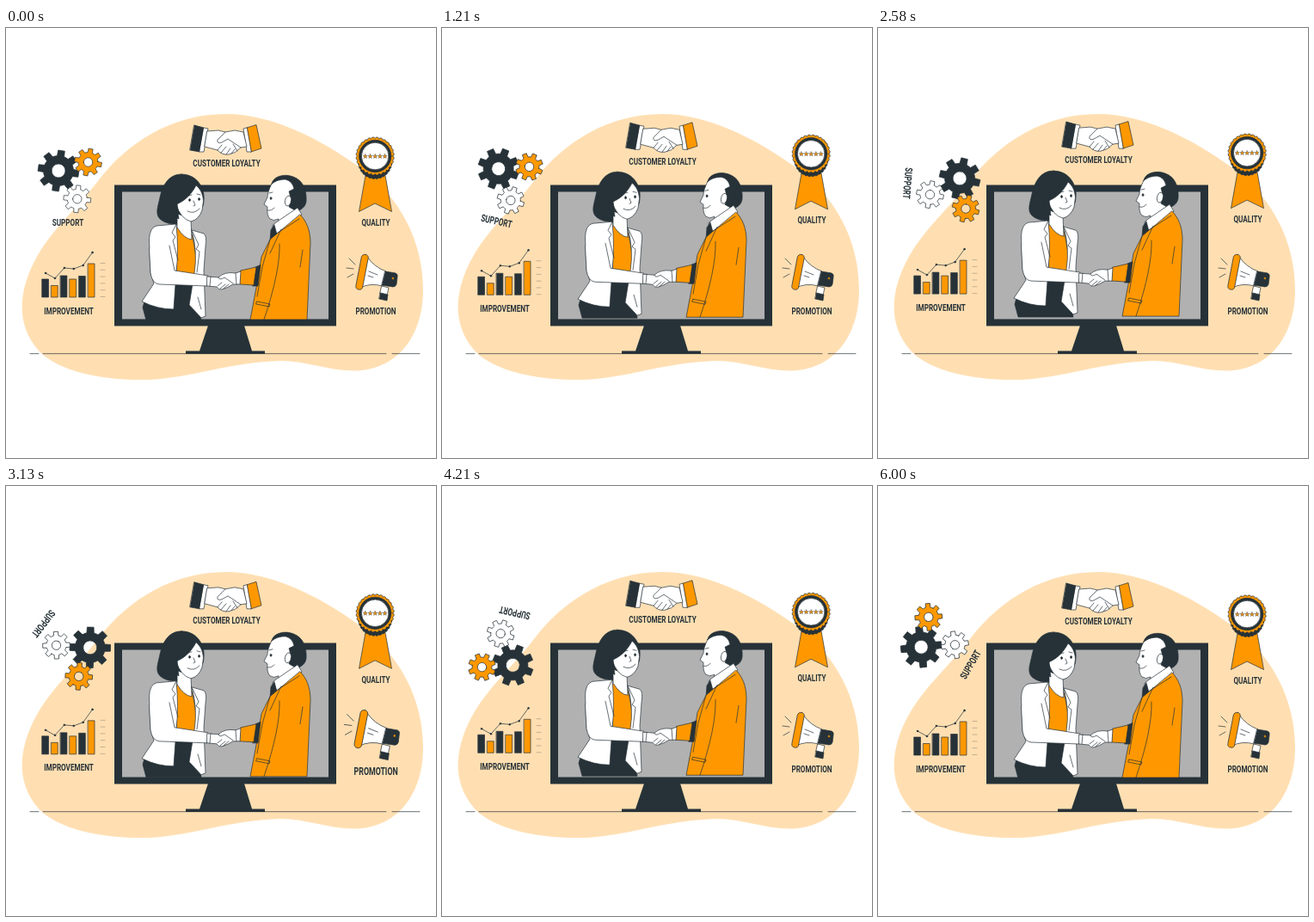
Recreate the animation shown at these times as an HTML page. Size 500 px wide and 500 px high, loop 6.04 s.

```html
<!DOCTYPE html>
<html lang="en">
<head>
<meta charset="utf-8">
<title>Customer loyalty</title>
<style>
  html, body { margin: 0; width: 100%; height: 100%; overflow: hidden; background: #fff; }
  svg { display: block; width: 100%; height: 100%; }
  text { font: 700 11.8px Roboto, "Liberation Sans", sans-serif; text-anchor: middle; fill: #263238; stroke: none; }
  .d { fill: #263238; }
  .o { fill: #ff9800; }
  .w { fill: #fff; }
  .n { fill: none; }
  .ink { stroke: #263238; stroke-width: .7; stroke-linejoin: round; stroke-linecap: round; }
</style>
</head>
<body>
<svg viewBox="0 0 500 500">
  <path fill="#ffdfb2" d="M256 100C190 100 140 136 110 174C83 210 57 230 37 264C11 309 12 352 44 381C76 406 135 411 175 408.500C225 404 260 389 320 387C350 387 375 399 407 398.500C454 397 485 360 485 304C485 250 460 196 407 159C366 130 310 100 256 100Z"/>
  <path class="n ink" d="M28 378.700H38M43 378.700H442M449 378.700H481"/>

  <!-- monitor -->
  <path class="d" d="M235 346H277L286 375.500H301V379H209V375.500H225Z"/>
  <path class="d" d="M126 182.500H384V346.400H126Z"/>
  <path fill="#b1b1b1" d="M135 190.500H375V338.500H135Z"/>

  <g class="float ink">
    <!-- woman -->
    <path class="d" d="M204 170C189 170 182 183 179 197C177 207 173 216 179 222C187 229 199 229 204 226L218 221L229 207C234 188 223 170 204 170Z"/>
    <path class="d" d="M161 318L159 325L163 340H227L219 290H196Z"/>
    <path class="o" d="M198 232L216 240Q222 262 222 288L199 284Z"/>
    <path class="w" d="M199 216L199 232Q207 245 216 246L215 222Z"/>
    <path class="w" d="M221 183C226 187 229 193 229.500 201L228 212Q224 223 215 225Q203 222 198 205C206 202 215 195 221 183Z"/>
    <path class="d" d="M196 199Q191 210 195 219L201 222Q199 212 199 203Z"/>
    <path class="w" d="M198 228L175 230Q167 232 166.500 246L168 284L172 297L158 318Q176 327 195 327L198 284Q201 258 198 228Z"/>
    <path class="w" d="M216 235L230 239Q234 242 232 254L230 282L232 335L227 337L213 322L219 285Q223 260 216 235Z"/>
    <path class="w" d="M166.500 256L168 285Q170 297 178 298L234 300L235 288L196 282L190 253"/>
    <path class="n" d="M198 228L193 238L197 243L194 247L200 270M217 237L224 252L221 257L225 260L222 284M223 313L227 327"/>
    <path class="n" d="M218 201L220 206L218 207M211 213Q219 217 225 210M211 195L216 194M222 193L226 194"/>
    <ellipse class="d" cx="213.500" cy="200" rx=".9" ry="1.500"/>
    <ellipse class="d" cx="224.500" cy="199" rx=".9" ry="1.500"/>

    <!-- man -->
    <path class="w" d="M309 181Q304 191 304 197L300 205L304 208Q303 218 307 222Q311 225 317 222L316 231L342 211L337 180Q322 170 309 181Z"/>
    <path class="d" d="M309 181C311 172 324 169 334 173C346 177 350 190 349 202C348 208 343 213 336 212L329 208C331 200 331 196 329 190L335 187Q333 178 325 176Q315 176 309 181Z"/>
    <ellipse class="w" cx="328" cy="201" rx="3.500" ry="6" transform="rotate(12 328 201)"/>
    <path class="w" d="M314 226L339 209L344 217L314 241L310 230Z"/>
    <path class="d" d="M312 229L315 240L307 247L308 235Z"/>
    <path class="o" d="M342 217C349 224 354 235 354 250L350 339H284L291 302L297 266L307 246L314 240Z"/>
    <path class="n" d="M307 246L298 278L292 312M320 234L307 262M318 251Q319 283 300 339M345 258L342 278M292 318L307 321L306 324L291 321ZM313 240L341 222"/>
    <ellipse class="d" cx="308" cy="198" rx=".9" ry="1.500"/>
    <path class="n" d="M304 212Q309 213 312 209M306 192L310 191"/>

    <!-- handshake on screen -->
    <path class="d" d="M290 278L296 275.500L293 300L287 300Z"/>
    <path class="o" d="M273 282L291 278L288 299L272 298Z"/>
    <path class="w" d="M234 289L247 290Q254 283 267 285L273 283L272 298L264 298Q258 302 251 304Q247 305 245 301L234 300Z"/>
    <path class="n" d="M267 285L268 298M238 289L237 300M247 290Q248 294 254 290L264 297M246 300L251 296M249 303L255 298M253 303L259 298"/>
  </g>

  <g class="float ink">
    <path class="d" d="M219 113L230 116L225 144L214 142Z"/>
    <path class="o" d="M280 116L291 112.500L297 140L285 144Z"/>
    <path class="w" d="M230 116L235 117L230 144L225 144Z"/>
    <path class="w" d="M280 116L276 117L280 144L285 144Z"/>
    <path class="w" d="M234 120L247 119L255 121L266 119L276 121L280 138L273 139Q267 146 259 147Q251 148 246 142L231 138Z"/>
    <path class="n" d="M255 121L246 130Q245 135 251 133L258 129L273 139M246 142L251 136M250 145L256 138M256 147L261 140M262 146L266 141M269 143L264 135"/>
    <text transform="translate(256.500 161.300) scale(.69 1)">CUSTOMER LOYALTY</text>
  </g>

  <g id="support" class="ink">
    <text transform="translate(72 230) scale(.69 1)">SUPPORT</text>
  </g>

  <g id="chart" class="float ink">
    <text transform="translate(73 332.500) scale(.69 1)">IMPROVEMENT</text>
  </g>

  <g id="badge" class="float ink">
    <path class="o" d="M419 166L410.500 213.500L429 204L448.500 213.500L440 166Z"/>
    <text transform="translate(430 230) scale(.69 1)">QUALITY</text>
  </g>

  <g id="promo" class="ink">
    <path class="n" d="M399 268L406 275M396 279L404 280M397 290L404 286"/>
    <path class="w" d="M437 300L445 302L443 311L435 309Z"/>
    <path class="d" d="M435.500 308L444 310L443 317L434 315Z"/>
    <path class="w" d="M420 266Q428 278 442 283L438 300Q423 296 412 302Z"/>
    <rect class="o" x="410" y="263" width="8" height="41.500" rx="4" transform="rotate(11 414 283.750)"/>
    <path class="d" d="M441 283L453 285Q456 286 455 290L454 298Q453 301 450 301L437 299Z"/>
    <path class="n" d="M422 283L432 287M421 288L427 290"/>
    <circle class="o" cx="450" cy="291" r="1.500"/>
    <text transform="translate(430 332.700) scale(.69 1)">PROMOTION</text>
  </g>
</svg>
<script>
const LOOP = 6040, FRAME = 1000 / 24, BEAT = 1500, LIFT = 7;
const $ = id => document.getElementById(id);

function add(parent, tag, attrs) {
  const el = document.createElementNS('http://www.w3.org/2000/svg', tag);
  for (const key in attrs) el.setAttribute(key, attrs[key]);
  return parent.appendChild(el);
}

const polar = (cx, cy, r, a) =>
  (cx + r * Math.cos(a)).toFixed(2) + ' ' + (cy + r * Math.sin(a)).toFixed(2);

function gear(cls, cx, cy, outer, root, hole, phase) {
  const step = Math.PI / 4;
  let d = '';
  for (let i = 0; i < 8; i++) {
    const a = i * step + phase;
    d += (i ? `A${root} ${root} 0 0 1 ` : 'M') + polar(cx, cy, root, a - .24) +
      'L' + polar(cx, cy, outer, a - .16) + 'L' + polar(cx, cy, outer, a + .16) +
      'L' + polar(cx, cy, root, a + .24);
  }
  d += `A${root} ${root} 0 0 1 ${polar(cx, cy, root, phase - .24)}Z`;
  d += `M${cx - hole} ${cy}a${hole} ${hole} 0 1 0 ${2 * hole} 0a${hole} ${hole} 0 1 0 ${-2 * hole} 0Z`;
  add($('support'), 'path', { class: cls, d, 'fill-rule': 'evenodd' });
}

gear('d', 61, 166, 24, 17.5, 8, .15);
gear('o', 95.5, 156, 16, 11.5, 5.2, .2);
gear('w', 82.8, 198.8, 16, 11.5, 5.2, .1);

function buildChart() {
  const chart = $('chart');
  [292, 299.5, 288, 292, 288.5, 274].forEach((top, i) =>
    add(chart, 'rect', { class: i % 2 ? 'o' : 'd', x: 42 + i * 10.7, y: top, width: 7.5, height: 313 - top }));
  const trend = [285, 291, 279, 280, 276, 261].map((y, i) => [46 + i * 10.9, y]);
  add(chart, 'polyline', { class: 'n', points: trend.join(' ') });
  for (const [cx, cy] of trend) add(chart, 'circle', { class: 'd', cx, cy, r: .9 });
  for (let y = 273.5; y < 315; y += 7.8)
    add(chart, 'path', { d: `M110 ${y}h5`, style: 'stroke:#a99a82' });
}

function scallop(cls, cx, cy, r) {
  const bumps = 28;
  let d = 'M' + polar(cx, cy, r, 0);
  for (let i = 1; i <= bumps; i++)
    d += 'A2.4 2.4 0 0 1 ' + polar(cx, cy, r, i * 2 * Math.PI / bumps);
  add($('badge'), 'path', { class: cls, d: d + 'Z' });
}

function star(cx, cy, r) {
  const points = Array.from({ length: 10 }, (_, i) =>
    polar(cx, cy, i % 2 ? r * .42 : r, (i / 5 - .5) * Math.PI));
  add($('badge'), 'polygon', { class: 'o', points: points.join(' '), style: 'stroke-width:.4' });
}

function buildBadge() {
  const cx = 429.2, cy = 149;
  scallop('d', cx, cy + 7, 18.5);
  scallop('o', cx, cy, 20.6);
  add($('badge'), 'circle', { class: 'd', cx, cy, r: 18.7 });
  add($('badge'), 'circle', { class: 'w', cx, cy, r: 15.8 });
  for (let i = -2; i <= 2; i++) star(cx + i * 5.7, cy + .3, 2.7);
}

buildChart();
buildBadge();

const floaters = document.querySelectorAll('.float');
const bump = (p, start, peak, end) =>
  p <= start || p >= end ? 0 : p < peak ? (p - start) / (peak - start) : (end - p) / (end - peak);

function draw(ms) {
  // The picture advances at 24 frames per second.
  const t = Math.floor((ms % LOOP + 4) / FRAME) * FRAME;
  const phase = t % BEAT / BEAT;
  const rise = -LIFT * (1 - Math.abs(1 - 2 * phase));
  for (const el of floaters) el.setAttribute('transform', `translate(0 ${rise.toFixed(2)})`);

  // Gears wait one second, then turn once every six.
  const angle = Math.max(0, t - 1000) * .06;
  $('support').setAttribute('transform', `rotate(${angle.toFixed(2)} 74 186)`);

  const scale = 1 + .1 * (bump(phase, 0, .1, .3) + bump(phase, .4, .5, .6));
  $('promo').setAttribute('transform', `translate(428 298) scale(${scale.toFixed(4)}) translate(-428 -298)`);
}

const start = performance.now();
function tick() {
  draw(performance.now() - start);
  requestAnimationFrame(tick);
}
tick();
</script>
</body>
</html>
```
